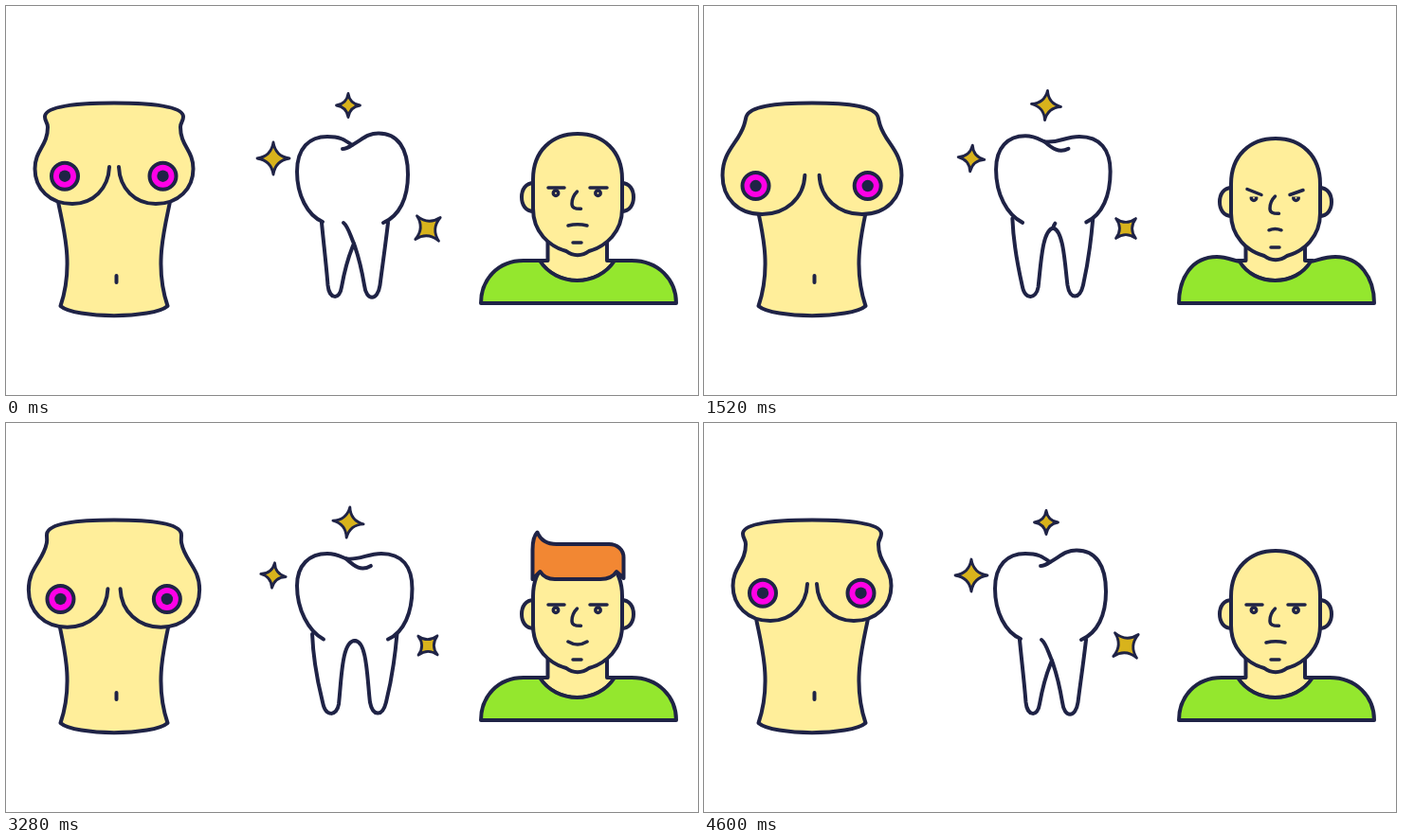
An HTML page that plays this animation: 730 px wide and 411 px high, repeating every 4640 ms.

```html
<!DOCTYPE html>
<html lang="en">
<head>
<meta charset="utf-8">
<title>Procedures</title>
<style>
html, body { margin: 0; width: 100%; height: 100%; overflow: hidden; background: #fff; }
svg { display: block; width: 100vw; height: 100vh; }
.ink { stroke: #1f2346; stroke-width: 4; stroke-linecap: round; stroke-linejoin: round; fill: none; }
.skin { fill: #ffee9a; }
.shirt { fill: #94e72e; }
.hair { fill: #f28733; }
.star { fill: #d8b31c; stroke-width: 2.8; }
</style>
</head>
<body>
<svg viewBox="0 0 730 411">
  <g class="ink">
    <path class="skin" d="M146 165L175 195C171 225 154 268 170.500 317C155 330.500 73 330.500 57.500 317C74 268 57 225 53 195L82 165"/>
    <path d="M116.500 285V292"/>
    <path id="bust" class="skin"/>
    <g id="dotL"><circle r="14" fill="#ff00e6"/><circle r="6.200" fill="#1f2346" stroke="none"/></g>
    <g id="dotR"><circle r="14" fill="#ff00e6"/><circle r="6.200" fill="#1f2346" stroke="none"/></g>
  </g>

  <g class="ink">
    <path id="roots"/>
    <path id="hook"/>
    <path id="crown"/>
    <path id="groove"/>
  </g>
  <g class="ink" id="stars"></g>

  <g class="ink">
    <path class="skin" d="M571.500 245V269H563C572 283 587 290 602.500 290C618 290 633 283 642 269H634V245"/>
    <path id="shirt" class="shirt"/>
    <g id="head">
      <path class="skin" d="M557 187C548 187 544 194 544 202C544 210 548 217 557 217M649 187C658 187 662 194 662 202C662 210 658 217 649 217"/>
      <path class="skin" d="M556 183C556 153 576 135 603 135C630 135 650 153 650 183V214C650 239 633 254 615 259C608 264.500 598 264.500 591 259C573 254 556 239 556 214Z"/>
      <g stroke-width="3.500">
        <circle cx="580" cy="197.700" r="2.700"/><circle cx="624.500" cy="197.700" r="2.700"/>
      </g>
      <path id="lids" class="skin" stroke="none"/>
      <path id="brows" stroke-width="3.500"/>
      <path d="M602.500 196C599.500 199 597 204 597 209C597 213 600 214.500 606.500 214.300" stroke-width="3.500"/>
      <path id="mouth" stroke-width="3.500"/>
      <path d="M598 250H607" stroke-width="3.500"/>
      <path id="hair" class="hair" d="M555.500 165V134C555.500 125 557 119 560.500 115.500C564 124 570 128 581 128H636C645 128 651.500 134 651.500 142V164L644 157C641 162 636 165 627 165H579C571 165 566 161 563.500 157Z"/>
    </g>
  </g>
</svg>
<script>
const LOOP = 4640, STEP = 40;
const $ = id => document.getElementById(id);
const set = (id, d) => $(id).setAttribute('d', d);
const move = (el, v) => el.setAttribute('transform', v);
const lerp = (a, b, p) => a + (b - a) * p;
const ease = p => (1 - Math.cos(Math.PI * Math.min(1, Math.max(0, p)))) / 2;
const ramp = (t, from, to) => ease((t - from) / (to - from));

// Blend two paths that share the same commands.
const NUM = /-?\d+(\.\d+)?/g;
function mix(a, b, p) {
  const to = b.match(NUM);
  let i = 0;
  return a.replace(NUM, n => lerp(+n, +to[i++], p).toFixed(2));
}

const BUST = [
  'M109 170C108 193 92 209 70 209C46 209 30.5 193 30.5 172C30.5 152 44 148 44 128C44 123 41 122 41 117C41 106 74 102.5 114 102.5C154 102.5 187 106 187 117C187 122 184 123 184 128C184 148 197.5 152 197.5 172C197.5 193 182 209 158 209C136 209 120 193 119 170',
  'M106 180C105 205 85 221.5 60 221.5C34 221.5 18 204 18 180C18 153 35 145 42 125.5C43.5 121.5 44 120 45 117C49 106 74 102.5 114 102.5C154 102.5 179 106 183 117C184 120 184.5 121.5 186 125.5C193 145 210 153 210 180C210 204 194 221.5 168 221.5C143 221.5 123 205 122 180'
];

// Tooth poses along the turn, from -1 (left) to 1 (right).
const TURN = [-1, -0.44, 0.28, 1];
const TOOTH = {
  crown: [
    'M334 228C318 221 307 200 307 175C307 150 320 138 339 138C352 138 357 141 365 147C376 141 381 134.5 393 134.5C413 134.5 424 150 424 178C424 203 415 222 398 229',
    'M334.5 228.5C319 220 307 197 307 173C307 150 319 138 338 138C349 138 352 140 359 143C372 145 380 137 395 137C417 137 427 152 427 176C427 202 418 222 401.5 228.5',
    'M335 228.5C319 220 307 197 307 172C307 150 320 138 339 138C348 138 353 141 359 143.5C374 145 381 138 396 138C418 138 428.5 152 428.5 175C428.5 200 420 221 403 228.5',
    'M339 230C321 222 311 204 311 175C311 149 321 135.5 339 135.5C350 135.5 353 139 360 143C374 146 379 138 396 138C417 138 429 151 429 174C429 201 422 219 404 228'
  ],
  groove: [
    'M365 147C362 149 359 151 355 151',
    'M359 143C364 149 371 151 378 147',
    'M359 143.5C368 152 375 157 385 151',
    'M360 143C366 147 374 152 383 150'
  ],
  roots: [
    'M333 229C335 250 338 275 339.5 295C341 310 352 311 354 297C357 280 361 265 367 251C371 262 375 277 378 295C380 312 392 312 394.5 295C397 275 400 255 403 229',
    'M326.5 226C328 252 331 275 335 295C338 311 350 310 352 297C355 270 357 250 368 234C379 248 379 270 382 295C384 310 396 310 399 295C404 275 407 252 409.5 226',
    'M323 223C324 250 329 275 334 295C337 311 349 310 351 297C354 270 354 230 368 230C381 230 381 270 384 295C387 310 397 311 401 295C406 275 410 252 412.5 223',
    'M332 229C333 255 337 275 340 295C342 311 354 311 357 297C360 277 364 258 369 247C375 258 379 275 382 295C383 310 394 310 397 295C400 275 402 255 404 228'
  ],
  hook: [
    'M367 251C363 242 361 233 356 229',
    'M368 234C366 230 364 229 360 232',
    'M368 230C368 230 368 230 368 230',
    'M369 247C371 240 373 234 377 229'
  ]
};

const SHIRT = [
  'M501 314C501 289 519 269 546 269C553 269 558 269 563 269C572 283 587 290 602.5 290C618 290 633 283 642 269C647 269 652 269 660 269C688 269 707 289 707 314Z',
  'M501 314C501 287 515 265 541 265C552 265 558 269 565 270C573 283 587 290 602.5 290C618 290 632 283 640 270C647 269 654 265 666 265C692 265 707 287 707 314Z'
];
const BROWS = ['M572 192L589 192M616 192L634 192', 'M573 188.5L588 194.5M618 194.5L632 189.5'];
const LIDS = ['M574 190H587V192H574ZM618 190H631V192H618Z', 'M574 190H587V196.5H574ZM618 190H631V196.5H618Z'];
const MOUTH = {
  flat: 'M593 232Q603 229.5 613 232',
  frown: 'M596 231.8Q602.5 229 609 231.8',
  smile: 'M593 231Q603 237 613 231'
};

// x, y, then radius and angle at both ends of the twinkle.
const STARS = [
  [361, 105, 12.5, 16.5, 0, 7],
  [282, 161, 17, 13, 0, 7],
  [445, 235, 17.5, 14, 49, 44]
].map(spec => {
  const el = document.createElementNS('http://www.w3.org/2000/svg', 'path');
  el.setAttribute('class', 'star');
  $('stars').append(el);
  return { el, spec };
});

function starPath(r) {
  const c = r * 0.13;
  return `M0 ${-r}Q${c} ${-c} ${r} 0Q${c} ${c} 0 ${r}Q${-c} ${c} ${-r} 0Q${-c} ${-c} 0 ${-r}Z`;
}

function drawBust(t) {
  const p = ramp(t, 840, 1720) - ramp(t, 2800, 3800);
  const y = lerp(179.7, 191.5, p);
  set('bust', mix(...BUST, p));
  move($('dotL'), `translate(${lerp(62, 53.5, p)} ${y})`);
  move($('dotR'), `translate(${lerp(165.5, 173.7, p)} ${y})`);
}

function drawTooth(t) {
  const turn = -Math.cos(2 * Math.PI * t / LOOP);
  const i = turn < TURN[1] ? 0 : turn < TURN[2] ? 1 : 2;
  const p = (turn - TURN[i]) / (TURN[i + 1] - TURN[i]);
  for (const id in TOOTH) set(id, mix(TOOTH[id][i], TOOTH[id][i + 1], p));
}

function drawStars(t) {
  const p = (1 - Math.cos(4 * Math.PI * t / LOOP)) / 2;
  for (const { el, spec: [x, y, r0, r1, a0, a1] } of STARS) {
    el.setAttribute('d', starPath(lerp(r0, r1, p)));
    move(el, `translate(${x} ${y}) rotate(${lerp(a0, a1, p)})`);
  }
}

function drawMan(t) {
  const anger = ramp(t, 0, 640) - ramp(t, 1680, 2120);
  const smile = ramp(t, 1720, 2120) - ramp(t, 4000, 4600);
  const bounce = 0.03 * (ramp(t, 1900, 2080) - ramp(t, 2120, 2480));
  const hair = ramp(t, 1600, 2080) - ramp(t, 3960, 4400) + bounce;
  move($('head'), `translate(0 ${5 * anger})`);
  set('shirt', mix(...SHIRT, anger));
  set('brows', mix(...BROWS, anger));
  set('lids', mix(...LIDS, anger));
  set('mouth', mix(mix(MOUTH.flat, MOUTH.frown, anger), MOUTH.smile, smile));
  $('hair').style.display = hair > 0.02 ? '' : 'none';
  move($('hair'), `translate(0 166) scale(1 ${hair}) translate(0 -166)`);
}

function draw(now) {
  const t = Math.floor(now % LOOP / STEP) * STEP;
  drawBust(t);
  drawTooth(t);
  drawStars(t);
  drawMan(t);
}

const start = performance.now();
function tick() {
  draw(performance.now() - start);
  requestAnimationFrame(tick);
}
tick();
</script>
</body>
</html>
```
